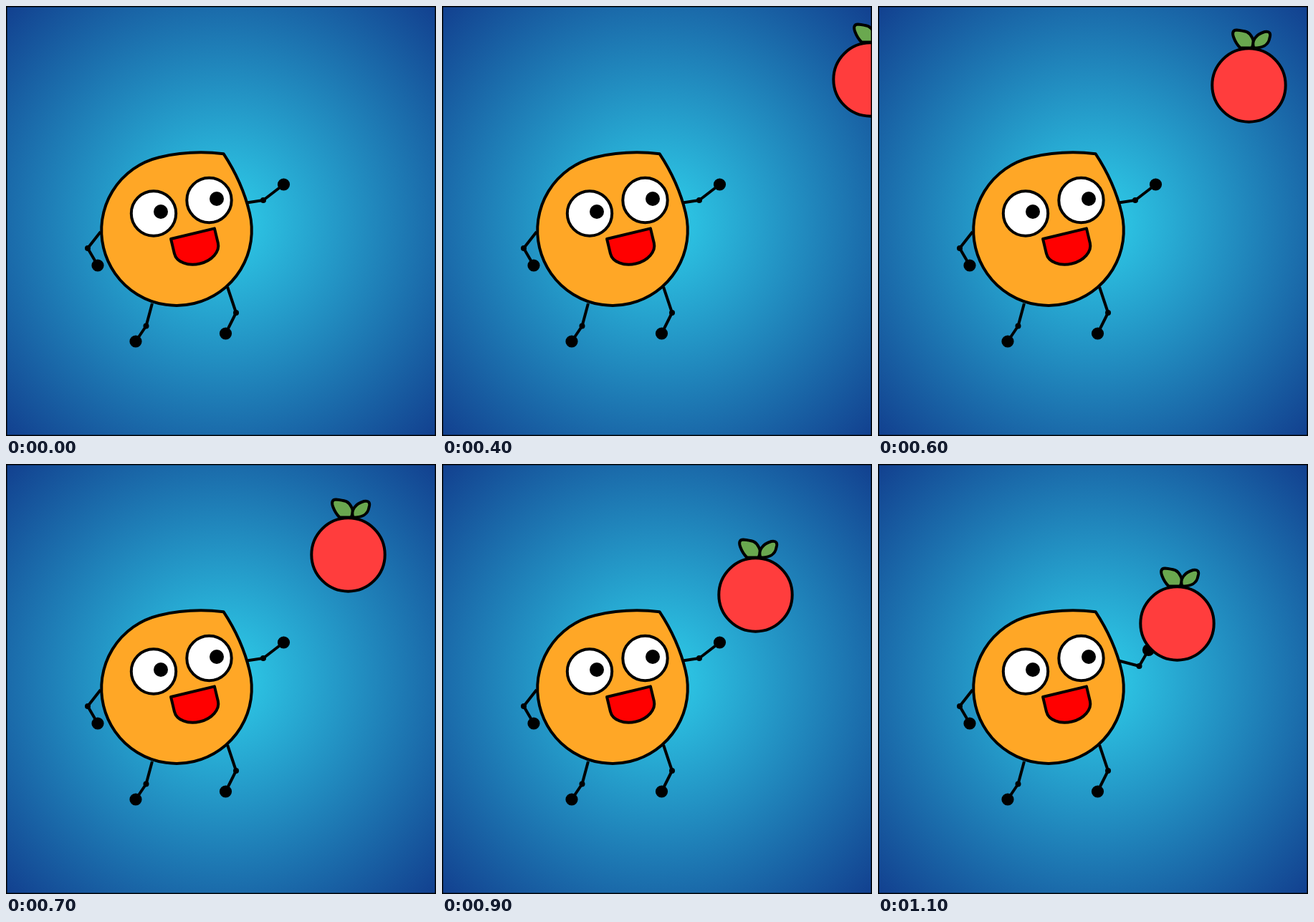
Animation, 600 px wide and 600 px high, one loop 6100 ms. Source, as an HTML page with a canvas:

```html
<!DOCTYPE html>
<html lang="en">
<head>
<meta charset="utf-8">
<title>Catching an apple</title>
<style>
html, body { margin: 0; width: 100%; height: 100%; overflow: hidden; }
canvas { display: block; width: 600px; height: 600px; }
</style>
</head>
<body>
<canvas id="stage" width="600" height="600"></canvas>
<script>
const ctx = document.getElementById('stage').getContext('2d');
const LOOP = 6100, STEP = 100, LANDED = 10, CAUGHT = 11;
const TILT = -13.5 * Math.PI / 180;

const backdrop = ctx.createRadialGradient(300, 300, 0, 300, 300, 424);
backdrop.addColorStop(0, '#2fd0eb');
backdrop.addColorStop(1, '#12408f');

// Parabola in time; the sideways speed doubles in the middle of the flight
function applePos(step) {
  const t = Math.min(step, LANDED);
  const boost = Math.min(Math.max(t - 4, 0), 3);
  return [677.5 - 20 * (t + boost), 101.5 + 4 * (t - 4.5) ** 2];
}

function paint(fill) {
  ctx.fillStyle = fill;
  ctx.fill();
  ctx.stroke();
}

function disc(x, y, r, fill, outlined) {
  ctx.beginPath();
  ctx.arc(x, y, r, 0, 2 * Math.PI);
  ctx.fillStyle = fill;
  ctx.fill();
  if (outlined) ctx.stroke();
}

function tilted(x, y, draw) {
  ctx.save();
  ctx.translate(x, y);
  ctx.rotate(TILT);
  ctx.beginPath();
  draw();
  ctx.restore();
}

function limb(x, y, jointX, jointY, endX, endY) {
  ctx.beginPath();
  ctx.moveTo(x, y);
  ctx.lineTo(jointX, jointY);
  ctx.lineTo(endX, endY);
  ctx.stroke();
  disc(jointX, jointY, 4, '#000');
  disc(endX, endY, 8.6, '#000');
}

function limbs(caught) {
  limb(132, 315, 114, 338, 128, 362);
  limb(204, 415, 195.5, 446.5, 181, 468);
  limb(309, 392, 321, 428, 306.5, 457);
  if (caught) limb(336, 274.5, 364.5, 282, 377.5, 259.5);
  else limb(336, 274.5, 359, 271, 387.5, 249);
}

function body() {
  const r = 104.8, tip = 0.846 * r;
  tilted(238, 313.1, () => {
    ctx.arc(0, 0, r, 0, 1.5 * Math.PI);
    ctx.quadraticCurveTo(tip / 2, -r, tip, -tip);
    ctx.quadraticCurveTo(r, -tip / 2, r, 0);
    ctx.closePath();
    paint('#ffa726');
  });
}

function eye(x, y, pupilX, pupilY) {
  disc(x, y, 31.2, '#fff', true);
  disc(pupilX, pupilY, 10, '#000');
}

function mouth() {
  const w = 31.3;
  tilted(260.5, 317.7, () => {
    ctx.moveTo(-w, 0);
    ctx.lineTo(w, 0);
    ctx.ellipse(0, 21, w, 22, 0, 0, Math.PI);
    ctx.closePath();
    paint('#f00');
  });
}

function apple(x, y) {
  ctx.save();
  ctx.translate(x, y);
  ctx.beginPath();
  ctx.moveTo(-12, -52);
  ctx.bezierCurveTo(-18, -58, -29, -77, -17, -77);
  ctx.bezierCurveTo(-4, -75, 0, -75.5, 4.5, -66.5);
  ctx.bezierCurveTo(8, -60, 6, -57, 4, -52);
  ctx.closePath();
  paint('#6aa84f');
  ctx.beginPath();
  ctx.moveTo(7, -52);
  ctx.bezierCurveTo(3, -62, 10, -71, 22, -74.5);
  ctx.bezierCurveTo(29, -76, 31, -72, 29, -66);
  ctx.bezierCurveTo(27, -54, 17, -52, 7, -52);
  ctx.closePath();
  paint('#6aa84f');
  disc(0, 0, 51.2, '#ff3d3d', true);
  ctx.restore();
}

function draw(ms) {
  const step = Math.floor((ms % LOOP) / STEP);
  ctx.fillStyle = backdrop;
  ctx.fillRect(0, 0, 600, 600);
  ctx.strokeStyle = '#000';
  ctx.lineWidth = 4;
  ctx.lineJoin = 'round';
  limbs(step >= CAUGHT);
  body();
  eye(206, 289.5, 216, 287);
  eye(283.5, 271, 294, 269);
  mouth();
  apple(...applePos(step));
  ctx.lineWidth = 3;
  ctx.strokeRect(0, 0, 600, 600);
}

const start = performance.now();
function tick() {
  draw(performance.now() - start);
  requestAnimationFrame(tick);
}
tick();
</script>
</body>
</html>
```
